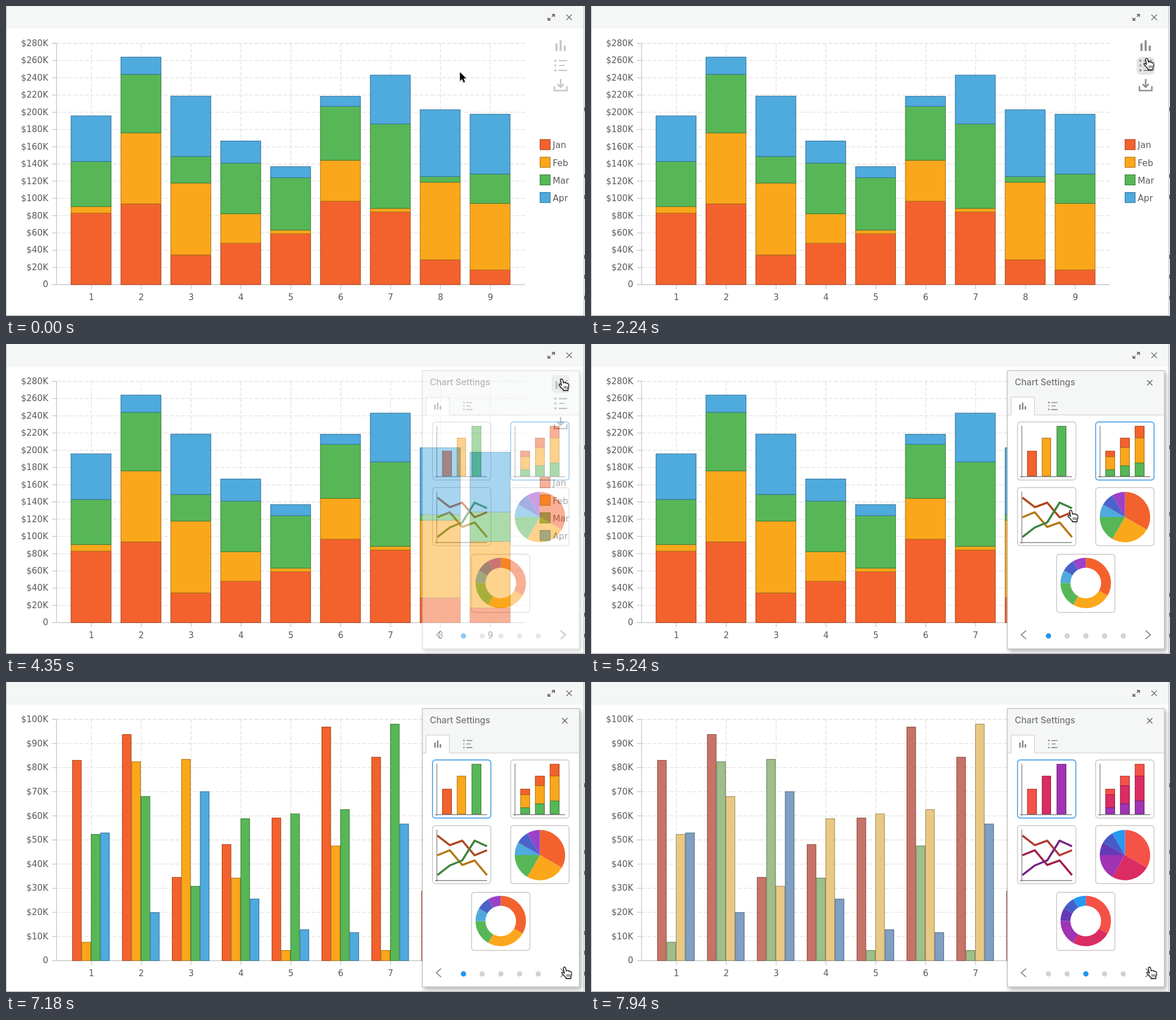
An HTML page for the animation above (8 s loop, 1022x548 px).

```html
<!DOCTYPE html>
<html lang="en">
<head>
<meta charset="utf-8">
<title>Chart settings</title>
<style>
html, body { margin: 0; width: 100%; height: 100%; overflow: hidden; background: #fff; }
svg { display: block; width: 1022px; height: 548px; }
.label { font: 15px "DejaVu Sans", Verdana, sans-serif; fill: #5a5a5a; }
.legend { font-size: 15.5px; }
.title { font: 500 15.6px Inter, Roboto, sans-serif; fill: #757575; }
.grid { stroke: #e1e1e1; stroke-width: 1.3; stroke-dasharray: 7 3; fill: none; }
.axis { stroke: #c6c6c6; stroke-width: 1.3; fill: none; }
.thumb-axis { stroke: #808080; stroke-width: 1.3; fill: none; }
</style>
</head>
<body>
<svg id="stage" viewBox="0 0 1022 548"></svg>
<script>
const LOOP = 8000;
const TOP = 66, BASE = 492.5, LEFT = 89, RIGHT = 916;
const MONTHS = ['Jan', 'Feb', 'Mar', 'Apr'];
const DATA = [
  [83, 93.7, 34.5, 48.1, 59.1, 96.8, 84.3, 28.8, 17.1],
  [7.6, 82.4, 83.4, 34.2, 4.2, 47.5, 4.2, 90, 77.2],
  [52.3, 68, 30.8, 58.8, 60.8, 62.6, 98, 6.6, 34.1],
  [52.9, 19.9, 70, 25.5, 12.8, 11.6, 56.6, 77.5, 69.3]
];
const PALETTES = [
  ['#f3622d', '#fba71b', '#57b757', '#4faade', '#4c62cb', '#9a42c8'],
  ['#f55247', '#db2c63', '#a034b4', '#6639b7', '#475cc8', '#2599f3'],
  ['#c77367', '#9fbe8a', '#e8c984', '#7f9fc3']
];

const dark = hex => 'rgb(' + [1, 3, 5].map(i => Math.round(parseInt(hex.substr(i, 2), 16) * .72)) + ')';
const centre = i => 150.2 + 88.03 * i;
const group = (body, attrs = '') => `<g ${attrs}>${body}</g>`;
const path = (d, attrs) => `<path d="${d}" ${attrs}/>`;
const box = (x, y, w, h, attrs) => `<rect x="${x}" y="${y}" width="${w}" height="${h}" ${attrs}/>`;
const disc = (x, y, r, attrs) => `<circle cx="${x}" cy="${y}" r="${r}" ${attrs}/>`;
const text = (x, y, s, attrs = 'class="label"') => `<text x="${x}" y="${y}" ${attrs}>${s}</text>`;
const poly = (pts, color, w) =>
  `<polyline points="${pts}" fill="none" stroke="${dark(color)}" stroke-width="${w}" stroke-linejoin="round"/>`;
const bar = (x0, x1, y0, y1, color) =>
  box(x0, y0, x1 - x0, y1 - y0, `fill="${color}" stroke="${dark(color)}" stroke-width="1.2"`);

function axes(max, step) {
  let grid = '', ticks = '', labels = '';
  for (let v = 0; v <= max; v += step) {
    const y = BASE - (BASE - TOP) * v / max;
    if (v) grid += `M${LEFT} ${y}H${RIGHT}`;
    ticks += `M81 ${y}H${LEFT}`;
    labels += text(74.5, Math.round(y - .1) + 5, v ? `$${v}K` : '0', 'class="label" text-anchor="end"');
  }
  for (let i = 0; i < 9; i++) {
    const x = centre(i) + .5;
    grid += `M${x} ${TOP}V${BASE}`;
    ticks += `M${x} ${BASE}v8`;
    labels += text(x, 520, i + 1, 'class="label" text-anchor="middle"');
  }
  return path(grid, 'class="grid"') +
    path(`${ticks}M${LEFT}.3 ${TOP}V${BASE}H${RIGHT}`, 'class="axis"') + labels;
}

function legend(colors) {
  return MONTHS.map((m, i) => {
    const y = 236 + 31.2 * i;
    return bar(942.7, 960.5, y, y + 18, colors[i]) +
      text(965, Math.round(y + 15.4), m, 'class="label legend"');
  }).join('');
}

function stackedChart(colors) {
  let s = axes(280, 20);
  for (let i = 0; i < 9; i++) {
    let y = BASE;
    DATA.forEach((row, k) => {
      const next = y - row[i] * (BASE - TOP) / 280;
      s += bar(centre(i) - 35.3, centre(i) + 35.3, next, y, colors[k]);
      y = next;
    });
  }
  return s + legend(colors);
}

const valueY = v => BASE - v * (BASE - TOP) / 100;

function lineChart(colors) {
  const lines = DATA.map((row, k) => {
    const pts = row.map((v, i) => [centre(i) + .3, valueY(v)]);
    return poly(pts.join(' '), colors[k], 3.8) +
      pts.map(p => disc(p[0], p[1], 4, `fill="${colors[k]}" stroke="${dark(colors[k])}" stroke-width="1.2"`)).join('');
  });
  return axes(100, 10) + lines.join('') + legend(colors);
}

function groupedChart(colors) {
  let s = axes(100, 10);
  for (let i = 0; i < 9; i++) {
    DATA.forEach((row, k) => {
      const x = centre(i) - 32.8 + 16.5 * k;
      s += bar(x, x + 15.5, valueY(row[i]), BASE, colors[k]);
    });
  }
  return s + legend(colors);
}

function ring(cx, cy, r, hole, colors) {
  const stops = [0, 120, 210, 270, 300, 330, 360];
  const at = (deg, rad) => {
    const a = deg * Math.PI / 180;
    return `${(cx + rad * Math.sin(a)).toFixed(2)} ${(cy - rad * Math.cos(a)).toFixed(2)}`;
  };
  return colors.map((c, i) => {
    const a = stops[i], b = stops[i + 1];
    return path(`M${at(a, r)}A${r} ${r} 0 0 1 ${at(b, r)}L${at(b, hole)}A${hole} ${hole} 0 0 0 ${at(a, hole)}Z`,
      `fill="${c}"`);
  }).join('');
}

const THUMBS = [[753, 138], [891, 138], [753, 254], [891, 254], [822, 372]];

function thumbs(colors, active) {
  const [a, b, c] = colors;
  const axis = (x, y) => path(`M${x + 7.5} ${y + 6.5}v92M${x + 4} ${y + 96.5}h92`, 'class="thumb-axis"');
  const frames = THUMBS.map(([x, y], i) => box(x - .2, y - .3, 103, 102.8,
    `rx="5" fill="#fff" stroke="${i === active ? '#2b90e2' : '#c6c6c6'}" stroke-width="1.4"`)).join('');
  let s = bar(770, 786, 189, 233, a) + bar(796, 811, 166, 233, b) + bar(822, 838, 145, 233, c);
  [[908, 189, 199, 222], [934, 166, 183, 215], [960, 145, 166, 210]].forEach(([x, y0, y1, y2]) => {
    s += bar(x, x + 16, y0, y1, a) + bar(x, x + 16, y1, y2, b) + bar(x, x + 16, y2, 233, c);
  });
  [[271, 288, 280, 306, 297], [306, 297, 323, 315, 341], [341, 324, 315, 280, 290]].forEach((row, k) => {
    s += poly(row.map((y, i) => [761 + 21.9 * i, y]).join(' '), colors[k], 3.7);
  });
  return frames + group(s, 'transform="translate(.4 .4)"') +
    axis(753, 138) + axis(891, 138) + axis(753, 254.5) +
    ring(942.5, 306, 44.5, 0, colors) + ring(873.3, 422.5, 44.5, 27, colors);
}

// Icons, drawn around (0, 0)
const barsIcon = 'M-7.3 9.5V-4M0 9.5V-9.5M7.3 9.5V0';
const listIcon = k => group(
  path('M-3.5-8.3H11.5M-2.5 0H7M-3.5 8.8H11.5', 'stroke-width="2.2"') +
  disc(-9.3, -8.3, 2, 'fill="currentColor" stroke="none"') + disc(-9.3, 0, 1.5, 'stroke-width="1.1"') +
  disc(-9.3, 8.8, 2, 'fill="currentColor" stroke="none"'), `transform="scale(${k})"`);
const tools = [
  path(barsIcon, 'stroke-width="3.6"'),
  listIcon(1),
  path('M0-11V3M-5.5-2L0 3.5L5.5-2M-11 1.5V9.5H11V1.5', 'stroke-width="2.7"')
];
const toolbar = tools.map((icon, i) =>
  box(963, 55 + 35 * i, 32, 31.5, `id="tile${i}" rx="7" fill="#e4e4e4"`) +
  group(icon, `transform="translate(979 ${70 + 35 * i})" fill="none" stroke="currentColor"`)).join('');
const cross = (x, y, r) => path(`M${x - r} ${y - r}l${2 * r} ${2 * r}m0 ${-2 * r}l${-2 * r} ${2 * r}`,
  'stroke="#707070" stroke-width="1.5" fill="none"');

const frame =
  box(0, 0, 1022, 548, 'fill="#fff"') +
  box(0, 0, 1020, 40, 'fill="#f5f6f6"') +
  path('M.5 0V547.3H1020.3V0', 'fill="none" stroke="#bdbdbd" stroke-width="1.4"') +
  [182, 300, 337, 443, 478, 515].map(y => box(1021, y - 3, 1, 7, 'fill="#444"')).join('') +
  path('M963.5 18.8L967 15.3M961 21.2L957.5 24.7', 'stroke="#707070" stroke-width="1.8"') +
  path('M962.8 14H969V20.2ZM955.8 19.8V26H962Z', 'fill="#707070"') +
  cross(994, 20, 4.8);

const panel =
  box(735, 47, 277, 492, 'fill="#fff" stroke="#c2c2c2" filter="url(#shadow)"') +
  box(735.5, 47.5, 276, 77.5, 'fill="#f5f6f6"') +
  path('M735 125.5H741.5V94H782.5V125.5H1012', 'fill="#fff" stroke="#cbcbcb"') +
  text(748, 73, 'Chart Settings', 'class="title"') + cross(986.3, 68.5, 4.6) +
  group(path(barsIcon, 'stroke-width="4"'), 'transform="translate(762 109.7) scale(.66)" stroke="#858585"') +
  group(listIcon(.72), 'transform="translate(815 109.5)" stroke="#858585" fill="none" color="#858585"') +
  group(group('', 'id="page0"') + group('', 'id="page1"'), 'clip-path="url(#inside)"') +
  path('M768 506.5L759.5 514L768 521.5M979 506.5L987.5 514L979 521.5', 'fill="none" stroke="#777" stroke-width="1.6"') +
  [0, 1, 2, 3, 4].map(i => disc(807.5 + 33 * i, 516, 4.7, `id="dot${i}"`)).join('') +
  path('M735 47H1012V539H735Z', 'fill="none" stroke="#c2c2c2"');

const arrow = path('M-.7 0V15.4L2.9 12.1L5.5 18L8.2 16.9L5.7 11.1H10.3Z',
  'fill="#000" stroke="#fff" stroke-width="1.3" paint-order="stroke" filter="url(#soft)"');
const hand = path('M-2 2C-2.4-.3 1-.8 1.6 1.4L3 7C3.4 5.4 6 5.4 6.4 7.2C7 6 9 6.4 9.4 8.2C10 7.2 12 7.8 12.2 10' +
  'C12.6 13 12 15 11 16.5V20H2.5V18.5C0 16-2 13.5-4.4 11C-6 9-3.4 7.8-2 9.4L-.4 11Z',
  'fill="#fff" stroke="#111" stroke-width="1.3" stroke-linejoin="round" filter="url(#soft)"') +
  path('M4.2 12.5v4.5M6.7 12.5v4.5M9.2 12.5v4.5', 'stroke="#111"');

const charts = {
  stacked: stackedChart(PALETTES[0]),
  line: lineChart(PALETTES[0]),
  grouped0: groupedChart(PALETTES[0]),
  grouped1: groupedChart(PALETTES[1]),
  grouped2: groupedChart(PALETTES[2])
};

document.getElementById('stage').innerHTML = `<defs>
  <filter id="shadow" x="-10%" y="-10%" width="120%" height="120%">
    <feDropShadow dx="3" dy="4" stdDeviation="3.5" flood-opacity=".3"/></filter>
  <filter id="soft" x="-50%" y="-50%" width="200%" height="200%">
    <feDropShadow dx="0" dy="1" stdDeviation="1" flood-opacity=".3"/></filter>
  <clipPath id="inside"><rect x="735.5" y="126" width="276" height="370"/></clipPath></defs>` +
  frame + Object.keys(charts).map(k => group(charts[k], `id="${k}"`)).join('') +
  group(toolbar, 'id="toolbar"') + group(panel, 'id="panel"') +
  group(group(arrow, 'id="arrow"') + group(hand, 'id="hand"'), 'id="cursor"');

const $ = id => document.getElementById(id);
const set = (id, name, value) => $(id).setAttribute(name, value);
const show = (id, amount) => set(id, 'opacity', +amount);

// Cursor moves: start, end, x, y, easing
const easeIn = p => p ** 1.4, easeOut = p => 1 - (1 - p) ** 1.7, smooth = p => p * p * (3 - 2 * p);
const MOVES = [
  [950, 1350, 936, 68, easeIn],
  [1350, 1650, 981, 62, easeOut],
  [2070, 2290, 981, 97, smooth],
  [2660, 2940, 981, 130, smooth],
  [3120, 3710, 981, 62, smooth],
  [4830, 5240, 847, 294, smooth],
  [5830, 6060, 818, 203, smooth],
  [6660, 7180, 986, 504, smooth]
];

function cursorAt(t) {
  let x = 802, y = 117;
  for (const [t0, t1, nx, ny, ease] of MOVES) {
    if (t <= t0) break;
    const p = ease(Math.min(1, (t - t0) / (t1 - t0)));
    x += (nx - x) * p;
    y += (ny - y) * p;
  }
  return [x, y];
}

// Areas of the panel that turn the arrow into a hand
const HOT = [...THUMBS.map(([x, y]) => [x, y, 103, 103]),
  [741, 94, 100, 31], [974, 55, 25, 26], [974, 498, 28, 32]];

let pageActive = -1;
function drawPages(active) {
  if (active === pageActive) return;
  pageActive = active;
  $('page0').innerHTML = thumbs(PALETTES[0], active);
  $('page1').innerHTML = thumbs(PALETTES[1], active);
}

function render(t) {
  const [x, y] = cursorAt(t);
  const open = t >= 4350;
  const palette = t >= 7940 ? 2 : t >= 7470 ? 1 : 0;
  const kind = t >= 6410 ? 'grouped' + palette : t >= 5530 ? 'line' : 'stacked';
  const fading = t >= 5530 && t < 5590;
  for (const k in charts) show(k, k === kind);
  if (fading) ['stacked', 'line'].forEach(k => show(k, .5));

  const overTools = x >= 962 && t < 4410;
  $('toolbar').style.color = overTools ? '#8e8e8e' : '#c6c6c6';
  const tile = overTools ? Math.floor((y - 53) / 35) : -1;
  for (let i = 0; i < 3; i++) show('tile' + i, i === tile);

  show('panel', open ? (t < 4410 ? .5 : 1) : 0);
  drawPages(t >= 6410 ? 0 : t >= 5530 ? 2 : 1);
  const slide = smooth(Math.min(1, Math.max(0, (t - 7470) / 240)));
  set('page0', 'transform', `translate(${-277 * slide} 0)`);
  set('page1', 'transform', `translate(${277 * (1 - slide)} 0)`);
  for (let i = 0; i < 5; i++) set('dot' + i, 'fill', i === palette ? '#2095f0' : '#d2d2d2');

  const overPanel = open && HOT.some(([hx, hy, w, h]) => x >= hx && x <= hx + w && y >= hy && y <= hy + h);
  const pointing = overTools || overPanel;
  show('hand', pointing);
  show('arrow', !pointing);
  set('cursor', 'transform', `translate(${x.toFixed(2)} ${y.toFixed(2)})`);
}

const start = performance.now();
function tick() {
  render((performance.now() - start) % LOOP);
  requestAnimationFrame(tick);
}
render(0);
requestAnimationFrame(tick);
</script>
</body>
</html>
```
